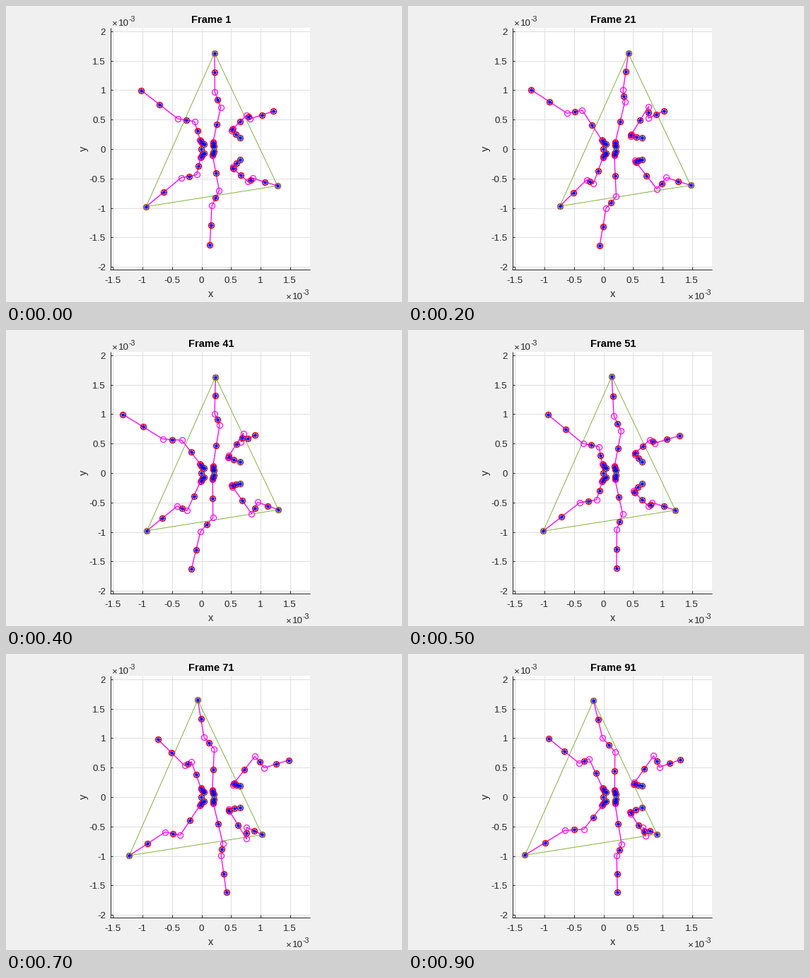
A matplotlib script for the animation above (1000 ms loop, 560x420 px).

```python
import numpy as np
import matplotlib.pyplot as plt
from matplotlib.animation import FuncAnimation
from matplotlib.patches import Rectangle

DPI, W, H = 70, 560, 420
STEPS, INTERVAL = 10, 100
X0, Y0, HALF = 276.1, 202.5, 41.8      # plot origin and pixels per half unit
LEFT, RIGHT, TOP, BOTTOM = 147.5, 430, 31, 373.5
INK, GREEN = "#262626", "#77ac30"
LIFT_OFF = 7.7                         # gait step at which a foot leaves the ground

# (pair, is upper leg, belongs to the support tripod)
LEGS = [("left", True, False), ("right", True, False), ("mid", False, False),
        ("mid", True, True), ("left", False, True), ("right", False, True)]


def pt(pixels):
    return pixels * 72 / DPI


def stride(q):
    """Foot travel along x: a steady stance, then an eased swing forward."""
    if q < LIFT_OFF:
        return 29.3 - q * (7.1 + 0.14 * q)
    t = (q - LIFT_OFF) / (STEPS - LIFT_OFF)
    return -30 + 59.3 * t * t * (3 - 2 * t)


def lift(q):
    return max(0, np.sin(np.pi * (q - LIFT_OFF) / (STEPS - LIFT_OFF)))


def leg_points(pair, upper, support, step):
    """Hip, coxa, shoulder, knee, ankle and foot in pixels."""
    phase = (step + 5) % STEPS if support else step
    q = (phase + 4) % STEPS
    s, up = stride(q), lift(q)
    sway = np.sin(2 * np.pi * (phase + 0.5) / STEPS)

    def joint(rest, slope, raised, bend=0):
        """Follow the stride, curve with its reach and shift while raised."""
        return np.add(rest, np.multiply(slope, s)) + np.multiply(raised, up) + (0, bend * s * s)

    if pair == "left":
        hip = (280.2, 196.3)
        coxa = (276.5 - 0.4 * sway, 193)
        shoulder = (274.7 - 0.8 * sway, 189.8)
        knee = joint((253.5, 147.7), (0.39, 0.1), (14.5, 17.5), 0.006)
        ankle = joint((237.5, 154), (0.68, 0.14), (6.5, 6.5), 0.0025)
        foot = (192.7 + s, 120 - sway)
    elif pair == "mid":
        hip = (293.8, 199.3)
        coxa = (292.7 - 0.4 * sway, 195.7)
        shoulder = (292.5 - 0.8 * sway, 192.6)
        knee = joint((300, 135), (0.3, 0.03), (2, 9), 0.001)
        ankle = joint((291, 118.5), (0.6, 0.025), (1, 3.5))
        foot = (289.5 + s, 66.3 - sway)
    else:
        hip = (330.5, 187)
        coxa = joint((317.7, 185.2), (0.17, 0.02), (2, -8.7))
        shoulder = coxa + (1.6, -3)
        knee = joint((345.5, 143.8), (0.29, 0.07), (-5, 11.7))
        ankle = joint((351.5, 160.2), (0.62, 0.06), (-6, 0))
        foot = (379 + s + 1.5 * sway, 149.6 - sway)

    points = np.array([hip, coxa, shoulder, knee, ankle, foot])
    if not upper:
        points[:, 1] = 2 * Y0 - points[:, 1]
    return points


fig = plt.figure(figsize=(W / DPI, H / DPI), dpi=DPI, facecolor="#f0f0f0")
ax = fig.add_axes([0, 0, 1, 1])
ax.set_xlim(0, W)
ax.set_ylim(H, 0)
ax.axis("off")


def segment(xs, ys, color):
    ax.plot(xs, ys, color=color, lw=pt(1), solid_capstyle="butt", zorder=1)


def label(x, y, text, size=13.33, **style):
    options = dict(family="Liberation Sans", fontsize=pt(size), color=INK,
                   ha="center", va="baseline")
    return ax.text(x, y, text, **{**options, **style})


def exponent(x, baseline):
    label(x, baseline, "×", ha="left")
    label(x + 10, baseline, "10", ha="left")
    label(x + 25, baseline - 5.5, "-3", size=10.67, ha="left")


def draw_axes():
    ax.add_patch(Rectangle((LEFT, TOP), RIGHT - LEFT, BOTTOM - TOP,
                           fc="white", ec="none", zorder=0))
    x_ticks = [(k, np.floor(X0 + HALF * k) + 0.5) for k in range(-3, 4)]
    y_ticks = [(k, np.floor(Y0 - HALF * k) + 0.5) for k in range(-4, 5)]
    for _, x in x_ticks:
        segment([x, x], [TOP, BOTTOM], "#dfdfdf")
    for _, y in y_ticks:
        segment([LEFT, RIGHT], [y, y], "#dfdfdf")
    for k, x in x_ticks:
        segment([x, x], [BOTTOM, BOTTOM - 3.5], INK)
        label(x, 393, f"{k / 2:g}")
    for k, y in y_ticks:
        segment([LEFT, LEFT + 3.5], [y, y], INK)
        label(141, y + 5.5, f"{k / 2:g}", ha="right")
    segment([LEFT, LEFT], [TOP, BOTTOM + 0.5], INK)
    segment([LEFT - 0.5, RIGHT], [BOTTOM, BOTTOM], INK)
    label(289.5, 413, "x", size=14.67)
    label(109.5, 202, "y", size=14.67, rotation=90, va="center")
    exponent(149, 28)
    exponent(395, 416)


def marker_set(marker, color, size, width, zorder):
    return ax.plot([], [], ls="none", marker=marker, ms=pt(size), mfc="none",
                   mec=color, mew=pt(width), zorder=zorder)[0]


draw_axes()
title = label(290, 24, "", size=14.67, weight="bold", color="black")
limbs, = ax.plot([], [], color="magenta", lw=pt(1.33), zorder=3)
joints = marker_set("o", "magenta", 8, 1.2, 4)
masses = marker_set("o", "red", 8, 1.4, 5)
hips = marker_set("o", "cyan", 6, 1, 6)
stars = marker_set((8, 2, 0), "blue", 7, 0.7, 7)
support_line, = ax.plot([], [], color=GREEN, lw=pt(0.9), zorder=2)
support_feet = marker_set("o", GREEN, 8, 0.9, 6)


def update(step):
    legs = [leg_points(*leg, step) for leg in LEGS]
    gap = np.full((1, 2), np.nan)
    limbs.set_data(*np.vstack([np.vstack([p, gap]) for p in legs]).T)
    joints.set_data(*np.vstack([p[1:5] for p in legs]).T)
    centres = [np.vstack([p[:1], (p[:-1] + p[1:]) / 2, p[-1:]]) for p in legs]
    mass_points = np.vstack(centres + [[(X0, Y0)]])
    masses.set_data(*mass_points.T)
    stars.set_data(*mass_points.T)
    hips.set_data(*np.array([p[0] for p in legs]).T)

    feet = np.array([p[-1] for p, leg in zip(legs, LEGS) if leg[2]])
    support_feet.set_data(*feet.T)
    support_line.set_data(*np.vstack([feet, feet[:1]]).T)
    title.set_text(f"Frame {10 * step + 1}")
    return limbs, joints, masses, hips, stars, support_line, support_feet, title


anim = FuncAnimation(fig, update, frames=STEPS, interval=INTERVAL,
                     repeat=True, repeat_delay=0, blit=False)
plt.show()
```
